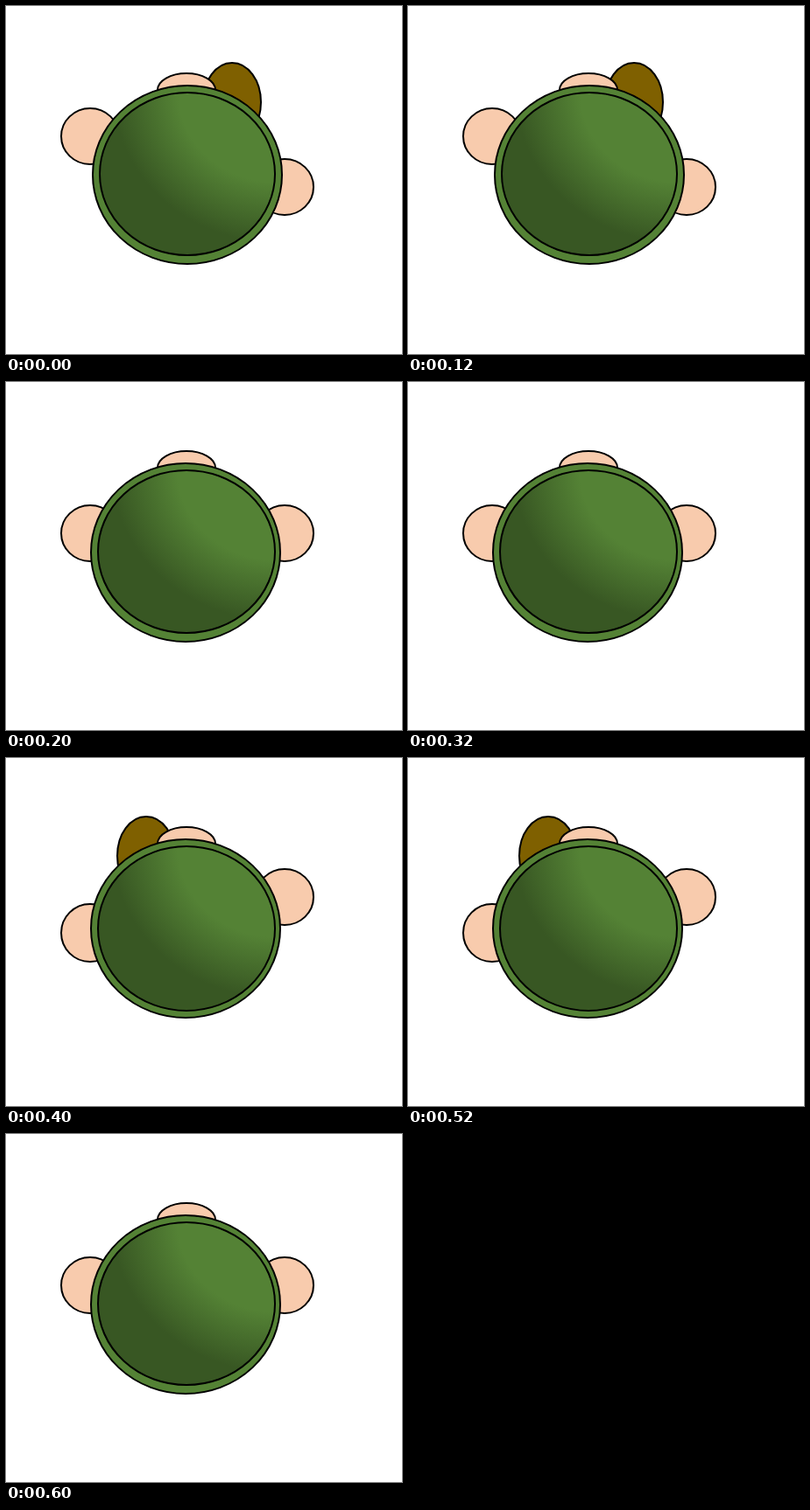
An HTML page for the animation above (0.8 s loop, 452 by 398 pixels).

```html
<!DOCTYPE html>
<html lang="en">
<head>
<meta charset="utf-8">
<title>Walk cycle</title>
<style>
  html, body { margin: 0; width: 100%; height: 100%; overflow: hidden; background: #fff; }
  svg { display: block; width: 452px; height: 398px; }
  ellipse { stroke: #000; stroke-width: 2; animation: .8s step-end infinite; }
  .skin { fill: #f8cbad; }
  .foot { fill: #7f6000; }
  .rim { fill: #548235; }

  #foot-r { animation-name: foot-r; }
  #foot-l { animation-name: foot-l; }
  #hand-l { animation-name: hand-l; }
  #hand-r { animation-name: hand-r; }
  #head { animation-name: head; }
  #rim { animation-name: rim; }
  #dome { animation-name: dome; }

  @keyframes foot-r { 0% { visibility: visible } 25%, 100% { visibility: hidden } }
  @keyframes foot-l { 0%, 75%, 100% { visibility: hidden } 50% { visibility: visible } }
  @keyframes hand-l {
    0% { cy: 149px; ry: 32px }
    25%, 75%, 100% { cy: 173px; ry: 32px }
    50% { cy: 200px; ry: 33px }
  }
  @keyframes hand-r {
    0% { cy: 207px }
    25%, 75%, 100% { cy: 173px }
    50% { cy: 159px }
  }
  @keyframes head { 0% { cy: 96px } 25%, 100% { cy: 98px } }
  @keyframes rim {
    0% { cx: 207px; cy: 193px }
    25%, 100% { cx: 205px; cy: 195px }
  }
  @keyframes dome {
    0% { cx: 207px; cy: 192px; rx: 100px; ry: 93px }
    25%, 75%, 100% { cx: 206px; cy: 194px; rx: 101px; ry: 93px }
    50% { cx: 206px; cy: 195px; rx: 101px; ry: 94px }
  }
</style>
</head>
<body>
<svg viewBox="0 0 452 398">
  <defs>
    <radialGradient id="shade" cx="1" cy="0" r="1.414">
      <stop offset=".39" stop-color="#548235"/>
      <stop offset=".65" stop-color="#385723"/>
    </radialGradient>
  </defs>
  <ellipse id="foot-r" class="foot" cx="258" cy="110" rx="33" ry="45"/>
  <ellipse id="foot-l" class="foot" cx="160" cy="112" rx="33" ry="45"/>
  <ellipse id="hand-l" class="skin" cx="96" cy="149" rx="33" ry="32"/>
  <ellipse id="hand-r" class="skin" cx="318" cy="207" rx="33" ry="32"/>
  <ellipse id="head" class="skin" cx="206" cy="96" rx="33" ry="19"/>
  <ellipse id="rim" class="rim" cx="207" cy="193" rx="108" ry="102"/>
  <ellipse id="dome" fill="url(#shade)" cx="207" cy="192" rx="100" ry="93"/>
</svg>
</body>
</html>
```
